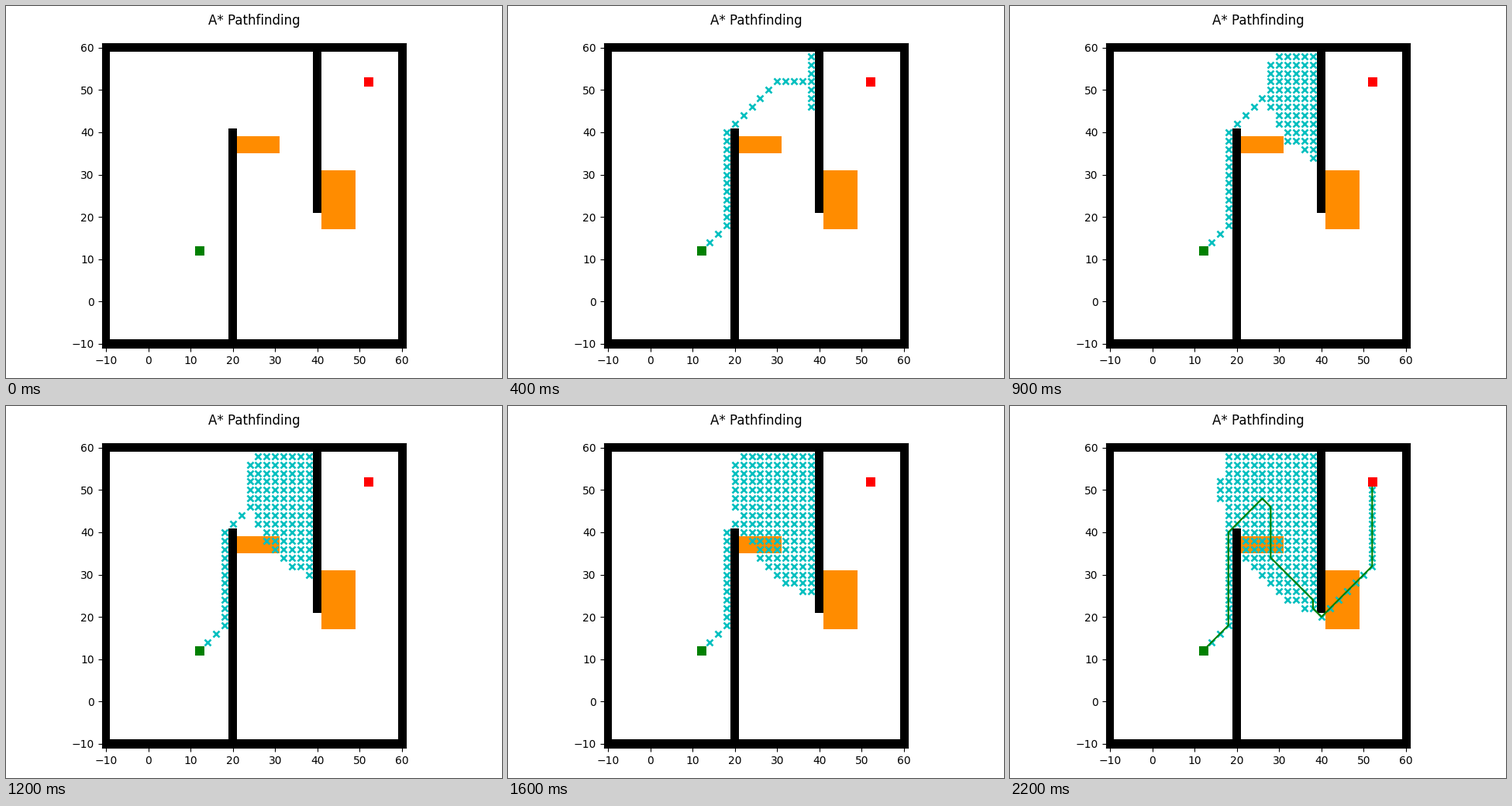
A matplotlib script that plays this animation: 640 by 480 pixels, repeating every 2300 ms.

```python
import matplotlib.pyplot as plt
import numpy as np
from matplotlib.animation import FuncAnimation
from matplotlib.patches import Rectangle
from math import hypot

W, H = 640, 480
UNIT = 5.457            # pixels per map unit
SIDE = 72 * UNIT
TOP = 48.37
CELL = 2                # grid resolution of the search
START, GOAL = (12, 12), (52, 52)
NODES_PER_STEP = 10
STEPS = 21
FLOOD = 154             # nodes tried before the way out is found
ROUTE = [START, (18, 18), (18, 40), (26, 48), (28, 46), (28, 34),
         (38, 24), (38, 22), (40, 20), (52, 32), GOAL]


def walk(*corners):
    """Grid nodes along straight or diagonal legs between the corners."""
    nodes = [corners[0]]
    for corner in corners[1:]:
        while nodes[-1] != corner:
            x, y = nodes[-1]
            nodes.append((x + CELL * int(np.sign(corner[0] - x)),
                          y + CELL * int(np.sign(corner[1] - y))))
    return nodes


def score(node):
    """Distance to the goal plus a little for straying from the first run."""
    x, y = node
    return hypot(GOAL[0] - x, GOAL[1] - y) + 0.15 * hypot(x - 30, y - 48)


def search_order():
    # Straight at the goal until the second wall blocks it, then along the wall
    order = walk((14, 14), (18, 18), (18, 40), (30, 52), (38, 52))
    column = [(38, y) for y in range(46, 60, CELL) if y != 52]
    order += sorted(column, key=lambda n: abs(n[1] - 52))

    # Flood the dead end, best score first
    seen = set(order)
    room = [(x, y) for x in range(16, 40, CELL) for y in range(20, 60, CELL)
            if (x, y) not in seen and not (x == 20 and y <= 40)]
    order += sorted(room, key=score)[:FLOOD]

    # Around the wall and up to the goal
    return order + walk((40, 20), (52, 32), (52, 50))


def block(x0, y0, x1, y1, color, z=1):
    ax.add_patch(Rectangle((x0, y0), x1 - x0, y1 - y0, fc=color, lw=0, zorder=z))


fig = plt.figure(figsize=(W / 100, H / 100), dpi=100)
fig.suptitle("A* Pathfinding")
ax = fig.add_axes([(W - SIDE) / 2 / W, (H - TOP - SIDE) / H, SIDE / W, SIDE / H])
ax.set(xlim=(-11, 61), ylim=(-11, 61),
       xticks=range(-10, 61, 10), yticks=range(-10, 61, 10))

block(21, 35, 31, 39, "darkorange")
block(41, 17, 49, 31, "darkorange")
block(19, -11, 21, 41, "black")
block(39, 21, 41, 61, "black")
for edge in (-11, 59):
    block(edge, -11, edge + 2, 61, "black")
    block(-11, edge, 61, edge + 2, "black")
for (x, y), color in [(START, "green"), (GOAL, "red")]:
    block(x - 1, y - 1.2, x + 1.2, y + 1, color, z=4)

visited, = ax.plot([], [], "xc", mew=1.9, zorder=2)
route, = ax.plot(*zip(*ROUTE), "-g", zorder=3)
nodes = search_order()


def update(frame):
    step = max(0, frame - 1)        # the empty map holds for two ticks
    shown = nodes[:step * NODES_PER_STEP]
    visited.set_data([n[0] for n in shown], [n[1] for n in shown])
    route.set_visible(step == STEPS)
    return visited, route


anim = FuncAnimation(fig, update, frames=STEPS + 2, interval=100, repeat=True,
                     repeat_delay=0, blit=False)
plt.show()
```
